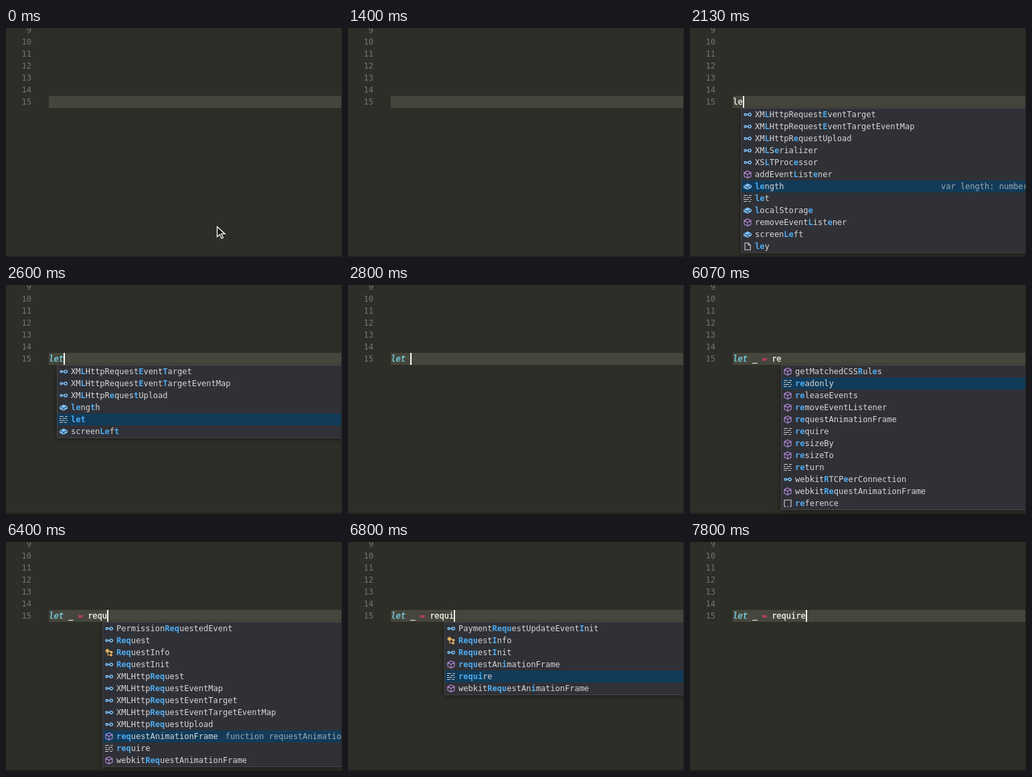
Write an HTML page that moves like this. It is 502x344 px and loops after 8 s.

```html
<!DOCTYPE html>
<html lang="en">
<head>
<meta charset="utf-8">
<title>Editor autocomplete</title>
<style>
  html, body { margin: 0; width: 100%; height: 100%; overflow: hidden; background: #2d2e28; }
  #stage {
    position: relative; width: 502px; height: 344px; overflow: hidden;
    background: #2d2e28; color: #f8f8f3;
    font: 12px/18px "DejaVu Sans Mono", monospace; white-space: pre;
  }
  #stage::after {
    content: ""; position: absolute; inset: 0;
    border: solid #23241f; border-width: 0 1px 2px 0; border-radius: 0 0 3px 3px;
  }
  #gutter { position: absolute; top: -6px; left: 0; width: 38px; text-align: right; color: #74756e; }
  #active { position: absolute; top: 102px; left: 64px; right: 0; height: 18px; background: #46463c; }
  #code { position: absolute; top: 102px; left: 64.3px; -webkit-text-stroke: .3px; }
  #code i { color: #78dcf0; }
  #code b { color: #ee3a73; font-weight: normal; }
  #caret { position: absolute; top: 102px; width: 2px; height: 18px; background: #fbfbf6; }
  .popup {
    position: absolute; top: 120px; width: 430px; box-sizing: border-box;
    border: 1px solid #45474b; background: #303136; color: #d6d7d8;
    box-shadow: 0 2px 8px #0006;
  }
  .row { position: relative; height: 18px; padding-left: 20px; }
  .row.on { background: #123b59; }
  .row b { color: #4cabf2; }
  .row svg { position: absolute; left: 3px; top: 3px; }
  .row span { color: #9aa9b6; margin-left: 11px; }
  .row span.right { position: absolute; left: 298px; margin: 0; }
  #mouse { position: absolute; left: 0; top: 0; overflow: visible; }
</style>
</head>
<body>
<div id="stage">
  <div id="gutter"></div>
  <div id="active"></div>
  <div id="code"></div>
  <div id="caret"></div>
  <svg id="mouse" width="14" height="20">
    <path d="M.5 .5V15.5L4.3 12L6.9 18L9.4 17L6.8 11.2H12Z" fill="#151515" stroke="#fff" stroke-width="1.3"/>
  </svg>
</div>
<script>
const LOOP = 8000, CHAR = 7.224, LEFT = 64.3;
const stage = document.getElementById('stage');
const code = document.getElementById('code');
const caret = document.getElementById('caret');
const mouse = document.getElementById('mouse');
document.getElementById('gutter').textContent = [9, 10, 11, 12, 13, 14, 15].join('\n');

const stroke = (color, d) => `<path d="${d}" fill="none" stroke="${color}" stroke-width="1.1"/>`;
const icons = {
  interface: '<g fill="none" stroke="#7cc0f8" stroke-width="1.5"><circle cx="2.6" cy="6" r="1.5"/>' +
    '<path d="M4 6H7"/><circle cx="9.2" cy="6" r="2.1"/></g>',
  method: stroke('#b489d8', 'M6 .7L11 3.2V8.8L6 11.4L1 8.8V3.2ZM1 3.2L6 5.8L11 3.2M6 5.8V11.4'),
  variable: '<path d="M0 5L6 1.5L12 4.5V7.5L6 11L0 8Z" fill="#7cc0f8"/>' +
    stroke('#303f50', 'M1 5.3L6 7.5L11 5M6 7.5V10'),
  keyword: stroke('#c8c9c9', 'M0 1.5H6M8 1.5H12M0 4.5H3M5 4.5H11M0 7.5H8M10 7.5H12M0 10.5H5M7 10.5H11'),
  file: stroke('#d0d1d1', 'M2 .7H7L10.3 4V11.3H2ZM7 .7V4H10.3'),
  alias: '<path d="M3.5 0L7 3.5L3.5 7L0 3.5ZM9.5 3L12 5.5L9.5 8L7 5.5ZM9 7.5L11.5 10L9 12L6.5 10Z" fill="#e3b15c"/>' +
    stroke('#e3b15c', 'M4 5V9.8H8M5 4.5H8'),
  snippet: stroke('#d0d1d1', 'M1 11V1H11V11') +
    '<path d="M1 11H11" stroke="#d0d1d1" stroke-width="1.2" stroke-dasharray="2 2"/>'
};
const kinds = { i: 'interface', m: 'method', v: 'variable', k: 'keyword', f: 'file', a: 'alias', s: 'snippet' };

// Each item is "<kind> label"; text between asterisks is a matched part.
function row(item, selected, detail) {
  const label = item.slice(2).replace(/\*(.+?)\*/g, '<b>$1</b>');
  return `<div class="row${selected ? ' on' : ''}"><svg width="12" height="12">${icons[kinds[item[0]]]}</svg>` +
    label + (selected ? detail : '') + '</div>';
}
function popup(left, selected, list, detail = '') {
  const el = document.createElement('div');
  el.className = 'popup';
  el.style.left = left + 'px';
  el.innerHTML = list.map((item, n) => row(item, n === selected, detail)).join('');
  stage.insertBefore(el, mouse);
  return el;
}
const mark = (list, pattern) => list.map(s => s.slice(0, 2) + s.slice(2).replace(pattern, '*$&*'));

const lengthInfo = '<span class="right">var length: number</span>';
const frameInfo = '<span>function requestAnimationFrame(callback)</span>';
const popups = {
  le: popup(76, 6, [
    'i XM*L*HttpRequest*E*ventTarget', 'i XM*L*HttpRequest*E*ventTargetEventMap',
    'i XM*L*HttpR*e*questUpload', 'i XM*LS*erializer'.replace('*LS*e', '*L*S*e*'),
    'i XS*L*TProc*e*ssor', 'm addEvent*L*ist*e*ner', 'v *le*ngth', 'k *le*t',
    'v *l*ocalStorag*e*', 'm removeEvent*L*ist*e*ner', 'v screen*Le*ft', 'f *le*y'
  ], lengthInfo),
  let: popup(76, 4, [
    'i XM*L*HttpRequest*E*vent*T*arget', 'i XM*L*HttpRequest*E*vent*T*argetEventMap',
    'i XM*L*HttpR*e*ques*t*Upload', 'v *le*ng*t*h', 'k *let*', 'v screen*Le*f*t*'
  ]),
  r: popup(129, 11, mark([
    'v Range', 'v RangeError', 'v ReadableStream', 'v ReferenceError', 'v Reflect', 'v RegExp',
    'i Request', 'a RequestInfo', 'i RequestInit', 'v Response', 'i ResponseInit', 'k readonly'
  ], /r/i)),
  re: popup(136, 1, [
    'm getMatchedCSS*R*ul*e*s', 'k *re*adonly', 'm *re*leaseEvents', 'm *re*moveEventListener',
    'm *re*questAnimationFrame', 'k *re*quire', 'm *re*sizeBy', 'm *re*sizeTo', 'k *re*turn',
    'i webkit*R*TCP*e*erConnection', 'm webkit*Re*questAnimationFrame', 's *re*ference'
  ]),
  req: popup(144, 9, mark([
    'i PermissionRequestedEvent', 'i Request', 'a RequestInfo', 'i RequestInit', 'i XMLHttpRequest',
    'i XMLHttpRequestEventMap', 'i XMLHttpRequestEventTarget', 'i XMLHttpRequestEventTargetEventMap',
    'i XMLHttpRequestUpload', 'm requestAnimationFrame', 'k require', 'm webkitRequestAnimationFrame'
  ], /req/i), frameInfo),
  requi: popup(144, 4, [
    'i Payment*Requ*estUpdateEvent*I*nit', 'a *Requ*est*I*nfo', 'i *Requ*est*I*nit',
    'm *requ*estAn*i*mationFrame', 'k *requi*re', 'm webkit*Requ*estAn*i*mationFrame'
  ])
};

// time, typed text, caret visible, open popup
const steps = [
  [0, '', 0], [870, '', 1], [1400, '', 0],
  [1800, 'l', 1], [1930, 'l', 1, 'le'], [2070, 'le', 1, 'le'],
  [2470, 'let', 1, 'le'], [2530, 'let', 1, 'let'], [2730, 'let ', 1],
  [3270, 'let ', 0], [3400, 'let _', 1], [3930, 'let _', 0],
  [4270, 'let _ ', 1], [4470, 'let _ =', 1], [4600, 'let _ = ', 1],
  [4930, 'let _ = r', 1], [5070, 'let _ = r', 1, 'r'], [5470, 'let _ = r', 0, 'r'],
  [6000, 'let _ = re', 0, 'r'], [6070, 'let _ = re', 0, 're'],
  [6200, 'let _ = req', 1, 're'], [6270, 'let _ = req', 1, 'req'],
  [6400, 'let _ = requ', 1, 'req'], [6600, 'let _ = requi', 1, 'req'],
  [6670, 'let _ = requi', 1, 'requi'], [7130, 'let _ = requi', 0, 'requi'],
  [7530, 'let _ = requir', 1, 'requi'], [7670, 'let _ = require', 1, 'requi'],
  [7800, 'let _ = require', 1]
];

let shown;
function showStep(step) {
  if (step === shown) return;
  shown = step;
  const [, text, on, open] = step;
  code.innerHTML = text.replace('=', '<b>=</b>').replace('let', '<i>let</i>');
  caret.style.left = Math.round(LEFT + text.length * CHAR) + 'px';
  caret.style.visibility = on ? 'visible' : 'hidden';
  for (const key in popups) popups[key].style.display = key === open ? 'block' : 'none';
}

// The pointer rests, then leaves in quick jumps.
function moveMouse(t) {
  const jump = t < 70 ? 0 : Math.floor((t - 70) / 66.7) + 1;
  mouse.style.display = jump > 3 ? 'none' : 'block';
  mouse.style.transform = `translate(${315 + jump * 49}px, ${298 - jump * 97}px)`;
}

function draw() {
  const t = performance.now() % LOOP;
  showStep(steps.findLast(s => s[0] <= t));
  moveMouse(t);
  requestAnimationFrame(draw);
}
draw();
</script>
</body>
</html>
```
